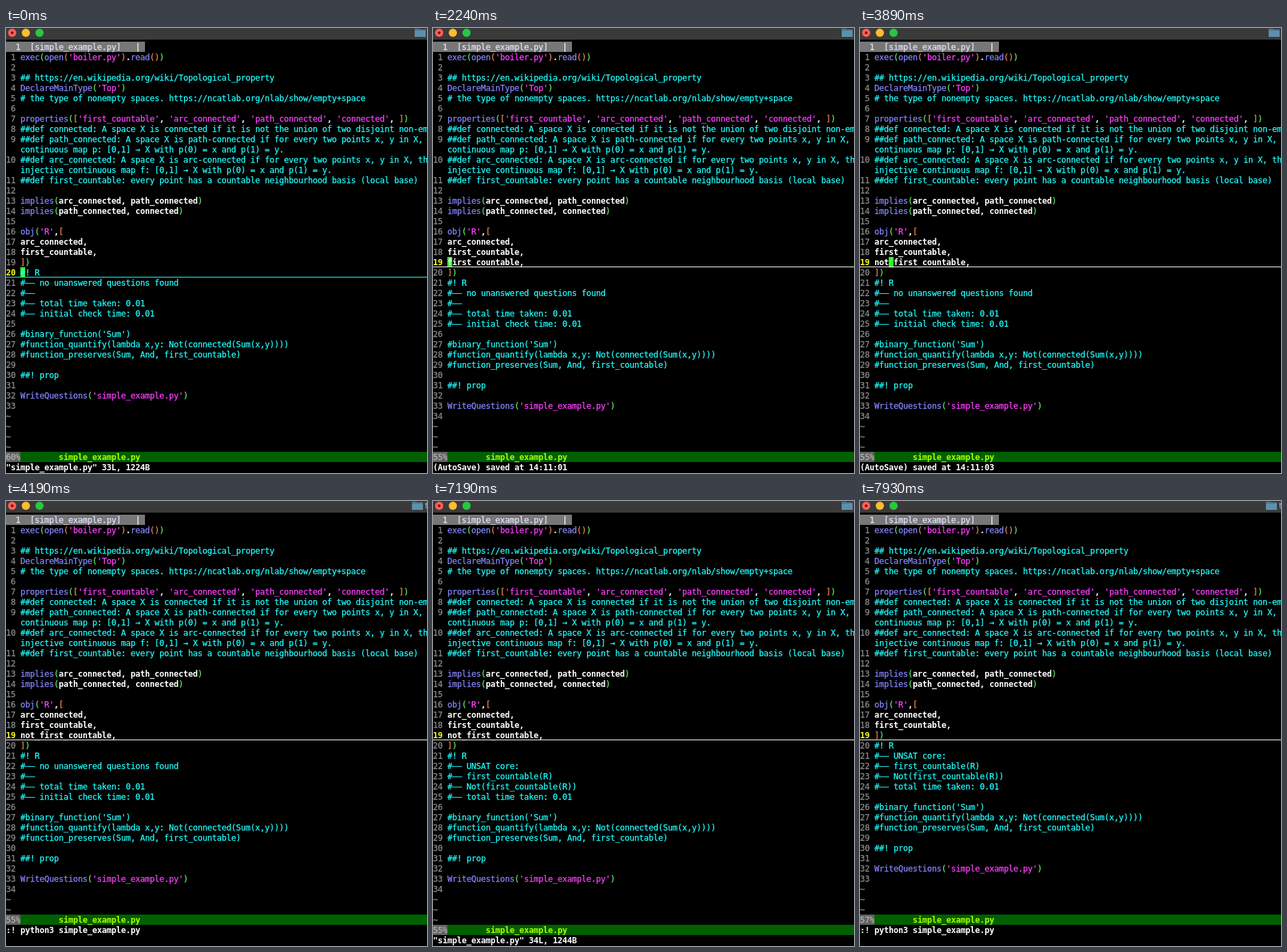
An HTML page with a canvas for the animation above (8 s loop, 615x651 px).

```html
<!DOCTYPE html>
<html lang="en">
<head>
<meta charset="utf-8">
<style>
html, body { margin: 0; width: 615px; height: 651px; overflow: hidden; background: #000; }
canvas { display: block; }
</style>
</head>
<body>
<canvas width="615" height="651"></canvas>
<script>
const ctx = document.querySelector('canvas').getContext('2d');
const CELL = 7, ROW = 15, TOP = 20, GUTTER = 3, LOOP = 8000;
const CYAN = '#21fdfd', WHITE = '#fff', VIOLET = '#8686ff', PINK = '#ff40ff', GREY = '#8c8c8c';
const BRACKETS = ['#62f062', '#f08a4b'];
const FILE = 'simple_example.py';

const head = `exec(open('boiler.py').read())

## https://en.wikipedia.org/wiki/Topological_property
DeclareMainType('Top')
# the type of nonempty spaces. https://ncatlab.org/nlab/show/empty+space

properties(['first_countable', 'arc_connected', 'path_connected', 'connected', ])
##def connected: A space X is connected if it is not the union of two disjoint non-empty
##def path_connected: A space X is path-connected if for every two points x, y in X, there\vcontinuous map p: [0,1] → X with p(0) = x and p(1) = y.
##def arc_connected: A space X is arc-connected if for every two points x, y in X, there\vinjective continuous map f: [0,1] → X with p(0) = x and p(1) = y.
##def first_countable: every point has a countable neighbourhood basis (local base)

implies(arc_connected, path_connected)
implies(path_connected, connected)

obj('R',[
arc_connected,
first_countable,`.split('\n');

const tail = `
#binary_function('Sum')
#function_quantify(lambda x,y: Not(connected(Sum(x,y))))
#function_preserves(Sum, And, first_countable)

##! prop

WriteQuestions('${FILE}')
`.split('\n');

const found = ['#–– no unanswered questions found', '#––', '#–– total time taken: 0.01', '#–– initial check time: 0.01'];
const unsat = ['#–– UNSAT core:', '#–– first_countable(R)', '#–– Not(first_countable(R))', '#–– total time taken: 0.01'];

const written = (lines, bytes) => `"${FILE}" ${lines}L, ${bytes}B`;
const saved = sec => `(AutoSave) saved at 14:11:0${sec}`;
const run = ':! python3 ' + FILE;

// Each step overrides part of the editor state from its time on.
const steps = [
  [0, { line: 20, col: 0, cursor: true, extra: null, result: found, msg: written(33, 1224), title: '', shell: false }],
  [1500, { line: 19 }],
  [1650, { line: 18 }],
  [2090, { cursor: false }],
  [2240, { line: 19, cursor: true, extra: 'first_countable,', msg: saved(1) }],
  [2690, { cursor: false, msg: '-- INSERT --' }],
  [2990, { cursor: true, col: 3, extra: 'notfirst_countable,', title: 's' }],
  [3590, { col: 4, extra: 'not_first_countable,' }],
  [3890, { col: 3, msg: saved(3), title: '' }],
  [4190, { cursor: false, msg: run, title: 't', shell: true }],
  [4490, { cursor: true, result: unsat, msg: written(34, 1244), title: '', shell: false }],
  [7190, { cursor: false }],
  [7340, { cursor: true, col: 0, extra: null, msg: saved(6) }],
  [7780, { cursor: false, msg: run }],
  [7930, { title: 't', shell: true }]
];

function box(x, y, w, h, color) {
  ctx.fillStyle = color;
  ctx.fillRect(x, y, w, h);
}

function dot(x, y, r, color) {
  ctx.fillStyle = color;
  ctx.beginPath();
  ctx.arc(x, y, r, 0, 7);
  ctx.fill();
}

// Terminal text: one character per cell.
function put(text, col, row, color, bold) {
  ctx.font = `${bold ? 'bold ' : ''}12px "DejaVu Sans Mono", monospace`;
  ctx.fillStyle = ctx.strokeStyle = color;
  ctx.lineWidth = 0.25;
  [...text].forEach((ch, i) => {
    const x = (col + i) * CELL, y = TOP + row * ROW + 12;
    ctx.fillText(ch, x, y);
    if (!bold) ctx.strokeText(ch, x, y);
  });
}

let depth = 0;
function putCode(text, row) {
  if (text[0] === '#') return put(text, GUTTER, row, CYAN);
  for (const m of text.matchAll(/'[^']*'|\w+|[^\s\w']/g)) {
    const token = m[0], next = text[m.index + token.length];
    let color = WHITE;
    if (token[0] === "'") color = PINK;
    else if ('(['.includes(token)) color = BRACKETS[depth++ % 2];
    else if (')]'.includes(token)) color = BRACKETS[--depth % 2];
    else if (next === '(') color = VIOLET;
    put(token, GUTTER + m.index, row, color, color === WHITE);
  }
}

function drawTitle(letter) {
  box(0, 0, 615, 17, '#3a3a3a');
  dot(9, 7, 6, '#ff5f57');
  dot(9, 7, 2, '#7a0c08');
  dot(29, 7, 6, '#febc2e');
  dot(49, 7, 6, '#28c840');
  const x = letter ? 593 : 597;
  box(x, 1, 7, 3, '#4a7896');
  box(x, 2, 16, 11, '#4a7896');
  box(x, 4, 16, 9, '#5d90ae');
  ctx.font = '12px Inter, sans-serif';
  ctx.fillStyle = '#b4b4b4';
  ctx.fillText(letter, 612, 11);
}

function drawTabs() {
  box(0, TOP, 29 * CELL, ROW, '#777');
  put('1', 2, 0, '#e4e4ff');
  put(`[${FILE}]`, 5, 0, '#e4e4ff');
  put('|', 27, 0, WHITE);
}

function drawStatus(state, total) {
  const row = state.shell ? 39 : 40, y = TOP + row * ROW;
  box(0, y, 615, ROW, '#006000');
  box(0, y, 3 * CELL, ROW, '#626262');
  put(Math.floor(state.line / total * 100) + '%', 0, row, '#b2b2b2');
  put(FILE, 11, row, '#a8ff00', true);
  put(state.msg, 0, row + 1, WHITE, true);
  return row;
}

function draw(state) {
  const extra = state.extra ? [state.extra] : [];
  const lines = [...head, ...extra, '])', '#! R', ...state.result, ...tail];
  box(0, 0, 615, 651, '#000');
  drawTitle(state.title);
  drawTabs();
  const statusRow = drawStatus(state, lines.length);
  let row = 1;
  depth = 0;
  lines.forEach((line, i) => {
    const current = i + 1 === state.line, y = TOP + row * ROW;
    if (current) {
      box(0, y + 14, 615, 1, line[0] === '#' ? CYAN : WHITE);
      if (state.cursor) box((GUTTER + state.col) * CELL, y, CELL, 14, '#2cff2c');
    }
    put(String(i + 1).padStart(2), 0, row, current ? '#ffff20' : GREY, current);
    const [first, wrapped] = line.split('\v');
    putCode(first, row++);
    if (wrapped) put(wrapped, GUTTER, row++, CYAN);
  });
  while (row < statusRow) put('~', 0, row++, GREY);
}

let shown = -1;
function frame(now) {
  const t = now % LOOP;
  const index = steps.filter(([at]) => at <= t).length;
  if (index !== shown) {
    shown = index;
    draw(Object.assign({}, ...steps.slice(0, index).map(step => step[1])));
  }
  requestAnimationFrame(frame);
}
frame(0);
</script>
</body>
</html>
```
